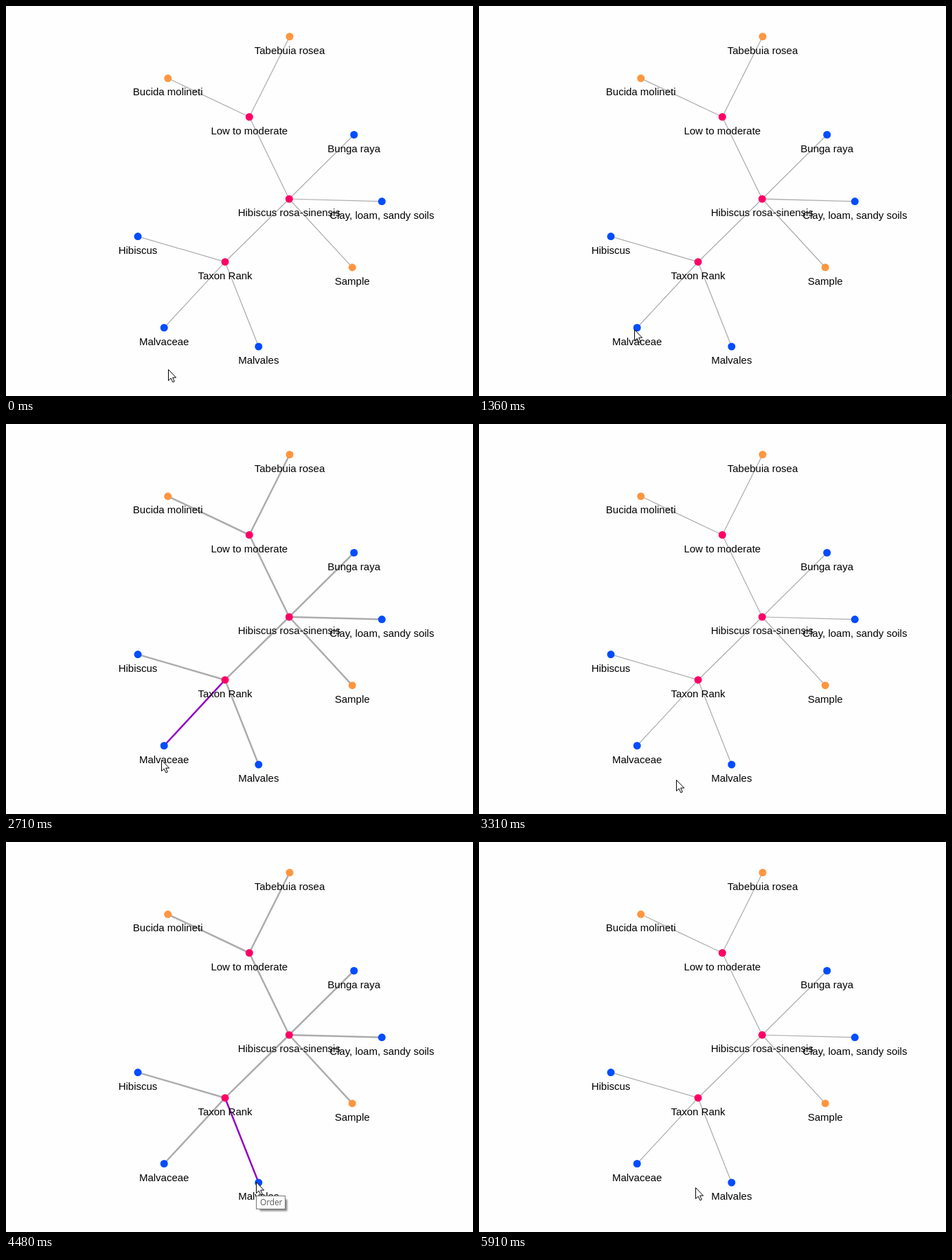
Recreate the animation shown at these times as an HTML page. Size 680 by 568 pixels, loop 6360 ms.

```html
<!DOCTYPE html>
<html lang="en">
<head>
<meta charset="utf-8">
<title>Plant graph</title>
<style>
  html, body { margin: 0; width: 100%; height: 100%; overflow: hidden; background: #fefefe; }
  svg { display: block; }
  .label { font: 15px "Liberation Sans", Arial, sans-serif; text-anchor: middle; fill: #000; }
  .pink { fill: #ff0066; }
  .blue { fill: #004cff; }
  .orange { fill: #ff9640; }
  .tip text { font: 11.8px "Open Sans", "Noto Sans", sans-serif; fill: #575757; }
  .tip .box { fill: #fff; stroke: #767676; }
  .tip .shadow { fill: #000; opacity: .45; filter: blur(1px); }
</style>
</head>
<body>
<svg width="680" height="568" viewBox="0 0 680 568">
  <g id="links"></g>
  <g id="nodes"></g>
  <g id="labels"></g>
  <g id="tips"></g>
  <path id="cursor" d="M.5 .5V16.6L4.2 13.1L6.9 18.9L9.3 17.8L6.7 12.1H11.6Z" fill="#fff" stroke="#000"/>
</svg>
<script>
const LOOP = 6360, STEP = 220 / 3, FADE = 300, TIP_FADE = 210;
const GRAY = [172, 172, 172], VIOLET = [144, 0, 200];

const node = (name, color, x, y, ...children) => ({ name, color, x, y, children });
const graph =
  node('Hibiscus rosa-sinensis', 'pink', 412.3, 281,
    node('Low to moderate', 'pink', 354.3, 161.5,
      node('Tabebuia rosea', 'orange', 413, 44.5),
      node('Bucida molineti', 'orange', 235.7, 105.3)),
    node('Bunga raya', 'blue', 506.7, 187.5),
    node('Clay, loam, sandy soils', 'blue', 547.3, 284.6),
    node('Sample', 'orange', 504.2, 380.7),
    node('Taxon Rank', 'pink', 319, 372.7,
      node('Hibiscus', 'blue', 192, 335.6),
      node('Malvaceae', 'blue', 230.2, 468.5),
      node('Malvales', 'blue', 367.8, 496)));

// Pointer moves, each starting where the last one ended; via bends the path
const home = [236, 529];
const moves = [
  { start: 687, end: 1340, to: [226, 471], via: [220, 485] },
  { start: 2530, end: 2863, to: [226, 524] },
  { start: 2863, end: 3157, to: [269, 524], via: [228, 538] },
  { start: 3157, end: 3890, to: [357, 496] },
  { start: 3890, end: 4183, to: [364, 495] },
  { start: 5310, end: 5897, to: [315, 503] }
];
const hovers = [
  { name: 'Malvaceae', on: 1340, off: 2640, tip: 'Family', tipOn: 1580, width: 47 },
  { name: 'Malvales', on: 3890, off: 5380, tip: 'Order', tipOn: 4260, width: 42 }
];
// Spans in which the picture moves; it rests between them
const bursts = [[760, 1820], [2570, 4500], [5310, 5920]];

const el = id => document.getElementById(id);
const clamp = v => Math.max(0, Math.min(1, v));
const mix = (a, b, k) => a + (b - a) * k;

function add(parent, tag, attrs, text) {
  const item = document.createElementNS('http://www.w3.org/2000/svg', tag);
  for (const key in attrs) item.setAttribute(key, attrs[key]);
  if (text) item.textContent = text;
  return parent.appendChild(item);
}

const links = [];
function build({ name, color, x, y, children }) {
  add(el('nodes'), 'circle', { class: color, cx: x, cy: y, r: 5.5 });
  add(el('labels'), 'text', { class: 'label', x, y: Math.round(y + 25.1) }, name);
  for (const child of children) {
    const line = add(el('links'), 'line', { x1: x, y1: y, x2: child.x, y2: child.y });
    links.push({ line, hover: hovers.find(h => h.name === child.name) });
    build(child);
  }
}

function buildTip(hover) {
  const { tip, tipOn, width } = hover;
  const [x, y] = pointer(tipOn).map((v, i) => v + [.5, 20.5][i]);
  hover.group = add(el('tips'), 'g', { class: 'tip' });
  add(hover.group, 'rect', { class: 'shadow', x: x + 5, y: y + 5, width: width - 2, height: 17 });
  add(hover.group, 'rect', { class: 'box', x, y, width, height: 19 });
  add(hover.group, 'text', { x: x + 5.5, y: y + 13.5 }, tip);
}

function capture(t) {
  let held = 0;
  for (const [start, end] of bursts) {
    if (t < start) break;
    held = start + Math.floor((Math.min(t, end) - start) / STEP + .01) * STEP;
  }
  return held;
}

function pointer(t) {
  let at = home;
  for (const { start, end, to, via } of moves) {
    if (t < start) break;
    const k = clamp((t - start) / (end - start));
    at = at.map((v, i) => {
      const mid = via ? via[i] : mix(v, to[i], .5);
      return Math.round(mix(mix(v, mid, k), mix(mid, to[i], k), k));
    });
  }
  return at;
}

function draw(now) {
  const t = capture(now % LOOP);
  for (const h of hovers) {
    h.level = clamp((t - h.on) / FADE) - clamp((t - h.off - STEP) / FADE);
    h.group.style.opacity = t < h.off ? clamp((t - h.tipOn) / TIP_FADE) : 0;
  }
  const wide = Math.max(...hovers.map(h => h.level));
  for (const { line, hover } of links) {
    const rgb = GRAY.map((c, i) => Math.round(mix(c, VIOLET[i], hover ? hover.level : 0)));
    line.setAttribute('stroke', `rgb(${rgb})`);
    line.setAttribute('stroke-width', mix(1.25, 2.5, wide));
  }
  el('cursor').setAttribute('transform', `translate(${pointer(t)})`);
}

function frame() {
  draw(performance.now());
  requestAnimationFrame(frame);
}

build(graph);
hovers.forEach(buildTip);
frame();
</script>
</body>
</html>
```
